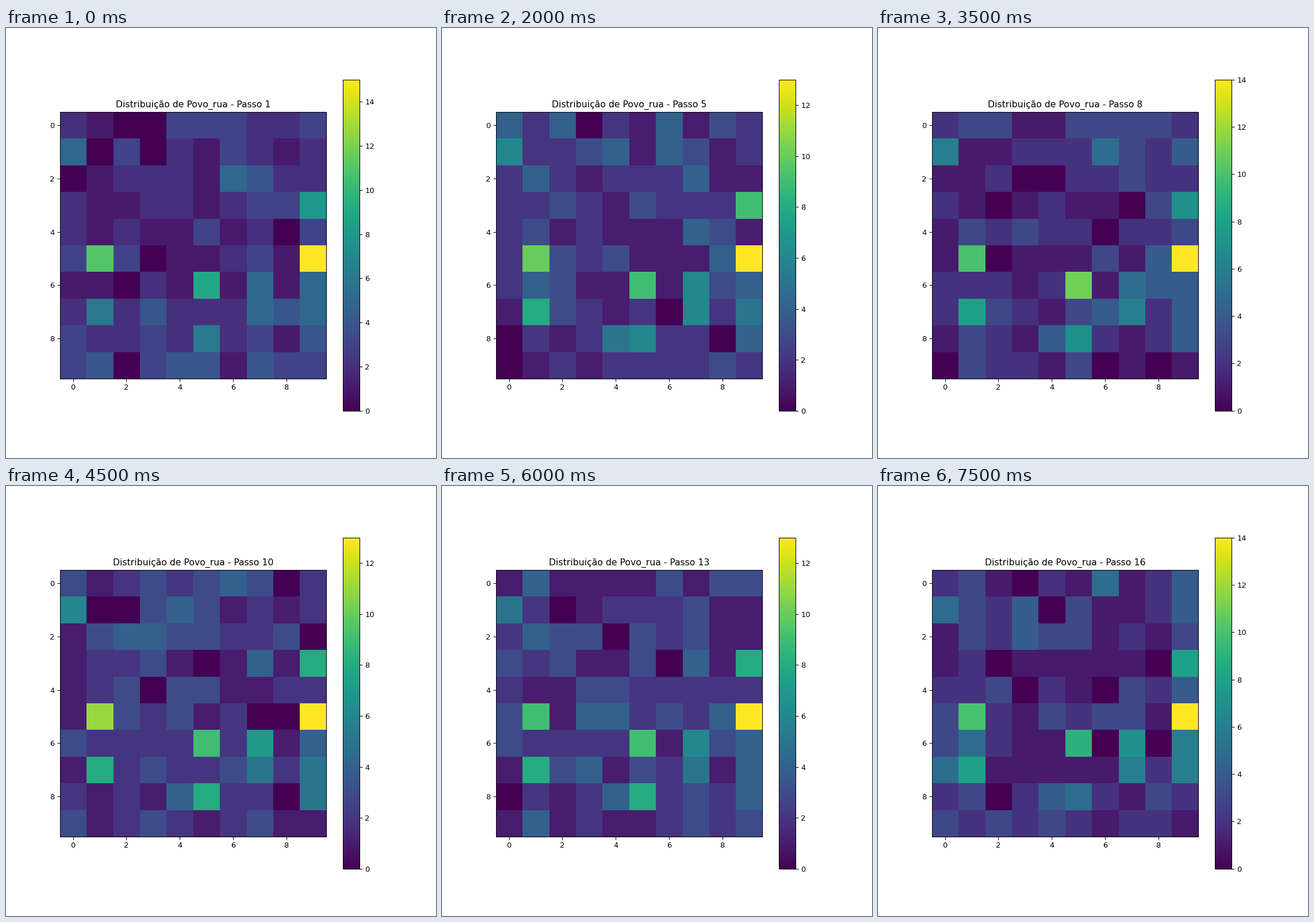
These frames come from a looping animation (748x748 px, 8 s). A matplotlib script:

```python
import matplotlib.pyplot as plt
import numpy as np
from matplotlib.animation import FuncAnimation

STAGE, INCHES = 748, 8
STEP_MS = 500
CELLS = 10

# Largest crowd at each step, always in the same cell
PEAKS = [15, 14, 13, 14, 13, 13, 15, 14, 14, 13, 13, 14, 13, 14, 14, 14]
PEAK_CELL = (5, 9)

# Usual crowd of the busy cells: (row, col) -> level
BUSY = {
    (0, 6): 4.5, (1, 0): 6, (3, 9): 8, (5, 1): 10, (6, 5): 9, (6, 7): 6,
    (6, 9): 4, (7, 1): 7.5, (7, 7): 5.5, (7, 9): 4.5, (8, 4): 4,
    (8, 5): 6, (8, 9): 4,
}


def crowd(step):
    """People per cell: a thin random spread plus the busy cells."""
    rng = np.random.default_rng(step)
    grid = rng.binomial(5, 0.36, (CELLS, CELLS))
    for cell, level in BUSY.items():
        grid[cell] = np.clip(round(rng.normal(level, 0.8)), 0, 12)
    grid[PEAK_CELL] = PEAKS[step]
    return grid


fig, ax = plt.subplots(figsize=(INCHES, INCHES), dpi=STAGE / INCHES)
image = ax.imshow(crowd(0), cmap="viridis", vmin=0, vmax=PEAKS[0])
fig.colorbar(image, ax=ax)
title = ax.set_title("")


def update(step):
    image.set_data(crowd(step))
    image.set_clim(0, PEAKS[step])
    title.set_text(f"Distribuição de Povo_rua - Passo {step + 1}")
    return image, title


anim = FuncAnimation(fig, update, frames=len(PEAKS), interval=STEP_MS,
                     repeat=True, blit=False)
plt.show()
```
